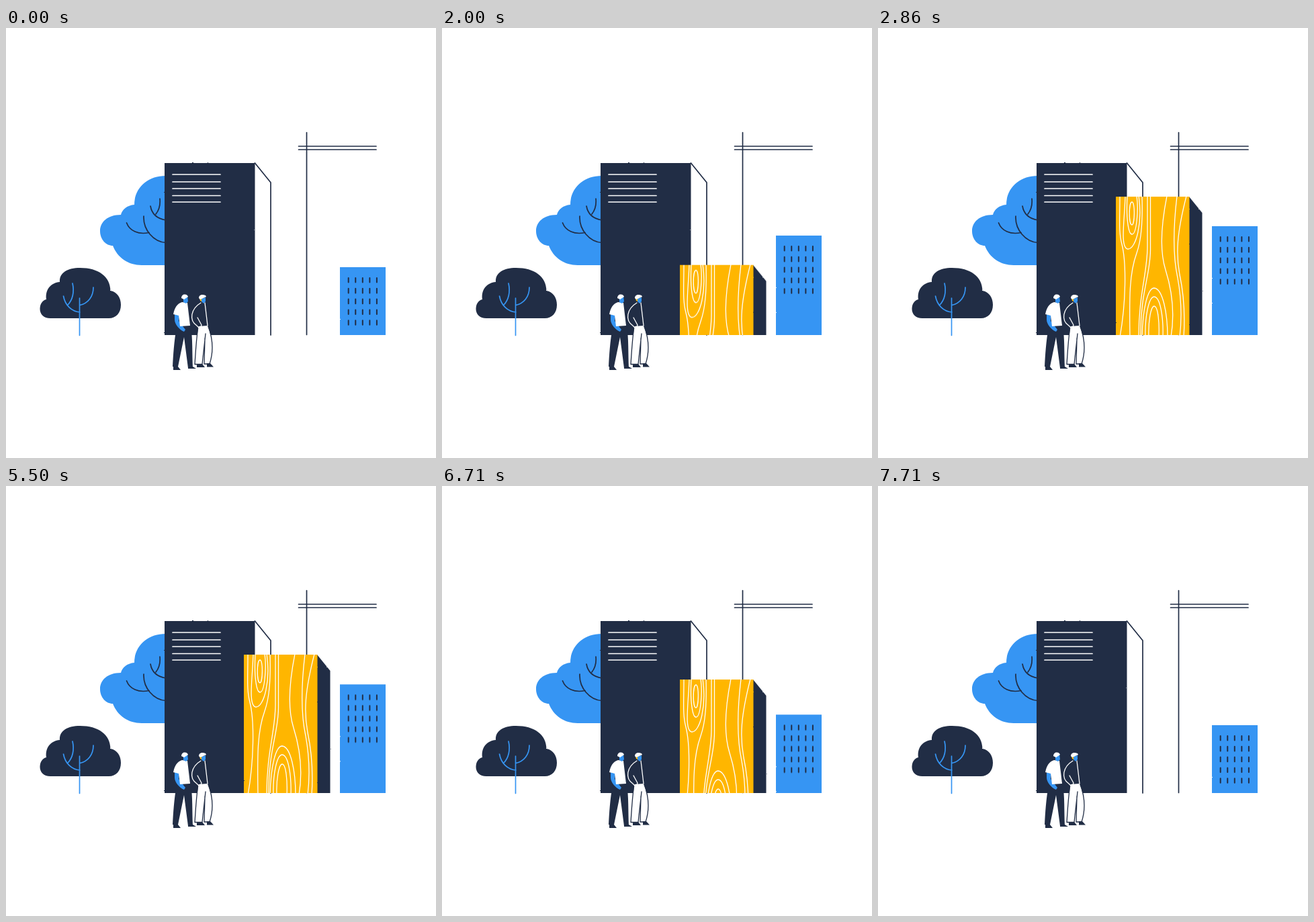
An HTML page that plays this animation: 640 px wide and 640 px high, repeating every 8000 ms.

```html
<!DOCTYPE html>
<html lang="en">
<head>
<meta charset="utf-8">
<title>Growing city</title>
<style>
  html, body { margin: 0; width: 100%; height: 100%; overflow: hidden; background: #fff; }
  svg { display: block; width: 100vw; height: 100vh; }
  .navy { fill: #212d45; }
  .blue { fill: #3695f3; }
  .gold { fill: #ffb600; }
  .white { fill: #fff; }
  .line { fill: none; stroke-width: 1.7; stroke-linecap: round; stroke-linejoin: round; }
  .thin { stroke-width: 1.3; }
  .ink { stroke: #212d45; }
  .sky { stroke: #3695f3; }
  .chalk { stroke: #fff; }
  #windows { stroke-width: 2; }
</style>
</head>
<body>
<svg viewBox="0 0 640 640">
  <defs>
    <filter id="rough" filterUnits="userSpaceOnUse" x="0" y="0" width="640" height="640" color-interpolation-filters="sRGB">
      <feTurbulence type="fractalNoise" baseFrequency="0.35" numOctaves="2" seed="4"/>
      <feDisplacementMap in="SourceGraphic" scale="1.6" xChannelSelector="R" yChannelSelector="G"/>
    </filter>
    <clipPath id="ground"><rect width="640" height="457"/></clipPath>
    <clipPath id="front"><rect x="354" y="251" width="109" height="300"/></clipPath>
  </defs>

  <!-- trees -->
  <path class="blue" d="M240 220C212 219 191 237 191 263C180 264 173 270 171 278C151 278 140 289 140 302C140 315 149 324 159 324C166 342 182 353 202 353H240Z"/>
  <path class="line ink" d="M179.500 290C184 302 197 308 213 304.500M205 280C204 300 219 318 238 319.500M229 254C230 264 227 272 223 277M215 265C217 277 226 284 238 286"/>
  <g filter="url(#rough)">
    <path class="navy" d="M66 432C56 432 50.500 426 50.500 418C50.500 410 55 405 60 404C58 389 67 379 80 378C79 364 92 357 110 357C138 357 155 370 155.500 391C166 393 171 402 171 412C171 424 164 432 153 432Z"/>
  </g>
  <path class="line sky" d="M109.500 402V457.500M110 412.500C122 410 130 400 130 386M85.500 399C88 413 98 422 110 423M99 380C102 393 99 405 92 412"/>

  <!-- tower and crane -->
  <g filter="url(#rough)">
    <rect class="navy" x="236" y="201" width="134.500" height="256"/>
  </g>
  <path class="line chalk" d="M248 218H319M248 229H319M248 239H319M248 249.500H319M248 259H319"/>
  <path class="line ink" d="M370.500 201L394 230V457M447.500 155.500V456.500M435.500 176H551M435.500 181H551"/>

  <!-- rising buildings -->
  <g clip-path="url(#ground)">
    <g id="block">
      <g filter="url(#rough)">
        <rect class="blue" x="497" y="295" width="68" height="240"/>
      </g>
      <path id="windows" class="line ink"/>
    </g>
    <g id="timber">
      <g filter="url(#rough)">
        <path class="navy" d="M463 251L482.500 275V550H463Z"/>
        <rect class="gold" x="354" y="251" width="109.500" height="300"/>
      </g>
      <path class="line chalk thin" clip-path="url(#front)" d="
        M360 250C360 285 358 304 363 322C370 350 369 410 360 460
        M368 250C367 285 360 328 372 329C384 329 394 290 388 250
        M378 259C373 259 373 293 378 293C382 293 383 259 378 259
        M371 250C369 285 373 307 378 307C385 307 388 270 385 250
        M393 250C394 290 392 315 385 335C374 365 374 400 375 460
        M401 250V325C401 365 388 395 388 460
        M405.500 250V330C405.500 368 390 395 391 460
        M430 250C420 300 420 335 428 360C439 395 441 430 436 460
        M445 250C439 300 439 340 446 372C452 405 452 435 449 460
        M459 250C445 305 443 335 449 367C456 400 457 430 455 460
        M393 460C394 415 402 387 411 387C424 388 431 425 431 460
        M398 460C397 430 403 400 411 400C420 400 425 430 424 460
        M403 460C402 438 406 414 411 414C417 414 419 440 418 460"/>
    </g>
  </g>

  <!-- left man -->
  <path class="navy" d="M254 444L275 443C278 462 277 485 278 506H271L265 460L256 504H248C249 485 250 468 254 444ZM249 504H256L260 509H249ZM271 504H278L283 507H271Z"/>
  <path class="blue" d="M251 426H258L257 436L267 449L265 452C258 449 251 441 251 434Z"/>
  <path class="white" d="M262 408L270 409L274 443L259 444L257 428L249 426C251 416 255 410 262 408Z"/>
  <path class="blue" d="M264 403L270 399L271 407L268 410L264 408Z"/>
  <path class="white" d="M261 402C261 397 266 395 270 398L271 400L265 404Z"/>

  <!-- right man -->
  <path class="white" d="M286 444L300 443C308 463 309 483 303 500H295L296 462L292 501H281Z"/>
  <path class="line ink thin" d="M286 444C283 465 282 485 281 500.500H292L297 455M296 462L295 500H303C309 482 308 463 301 444"/>
  <path class="navy" d="M284 500H292L296 505H284ZM299 499H304L309 504.500H299Z"/>
  <path class="navy" d="M290 409L296 408L300 443H288L284 446C273 434 275 418 290 409Z"/>
  <path class="line chalk thin" d="M290 409C275 418 272 435 284 443L289 448L291 442L285 431M296 409L300 443"/>
  <path class="gold" d="M288 402L293 400L293 408L289 406Z"/>
  <path class="blue" d="M291 403L297 401V407L294 410L291 407Z"/>
  <path class="white" d="M287 402C287 397 292 396 297 398L298 400L289 404Z"/>
</svg>
<script>
  const LOOP = 8000;
  const EASE = 'cubic-bezier(.7, 0, .3, 1)';

  const dashes = [];
  for (let row = 0; row < 5; row++)
    for (let col = 0; col < 5; col++)
      dashes.push(`M${509.7 + col * 10.55} ${311 + row * 15.8}v6.6`);
  document.getElementById('windows').setAttribute('d', dashes.join(''));

  // drop: hidden depth in px; times in ms
  const parts = [
    { id: 'block', drop: 61, up: [1220, 2520], down: [5305, 7705] },
    { id: 'timber', drop: 210, up: [1100, 2885], down: [6168, 7645] }
  ];

  for (const { id, drop, up, down } of parts) {
    const key = (time, y, easing = 'linear') =>
      ({ offset: time / LOOP, transform: `translateY(${y}px)`, easing });
    const motion = document.getElementById(id).animate([
      key(0, drop),
      key(up[0], drop, EASE),
      key(up[1], 0),
      key(down[0], 0, EASE),
      key(down[1], drop),
      key(LOOP, drop)
    ], { duration: LOOP, iterations: Infinity });
    motion.startTime = 0;
  }
</script>
</body>
</html>
```
